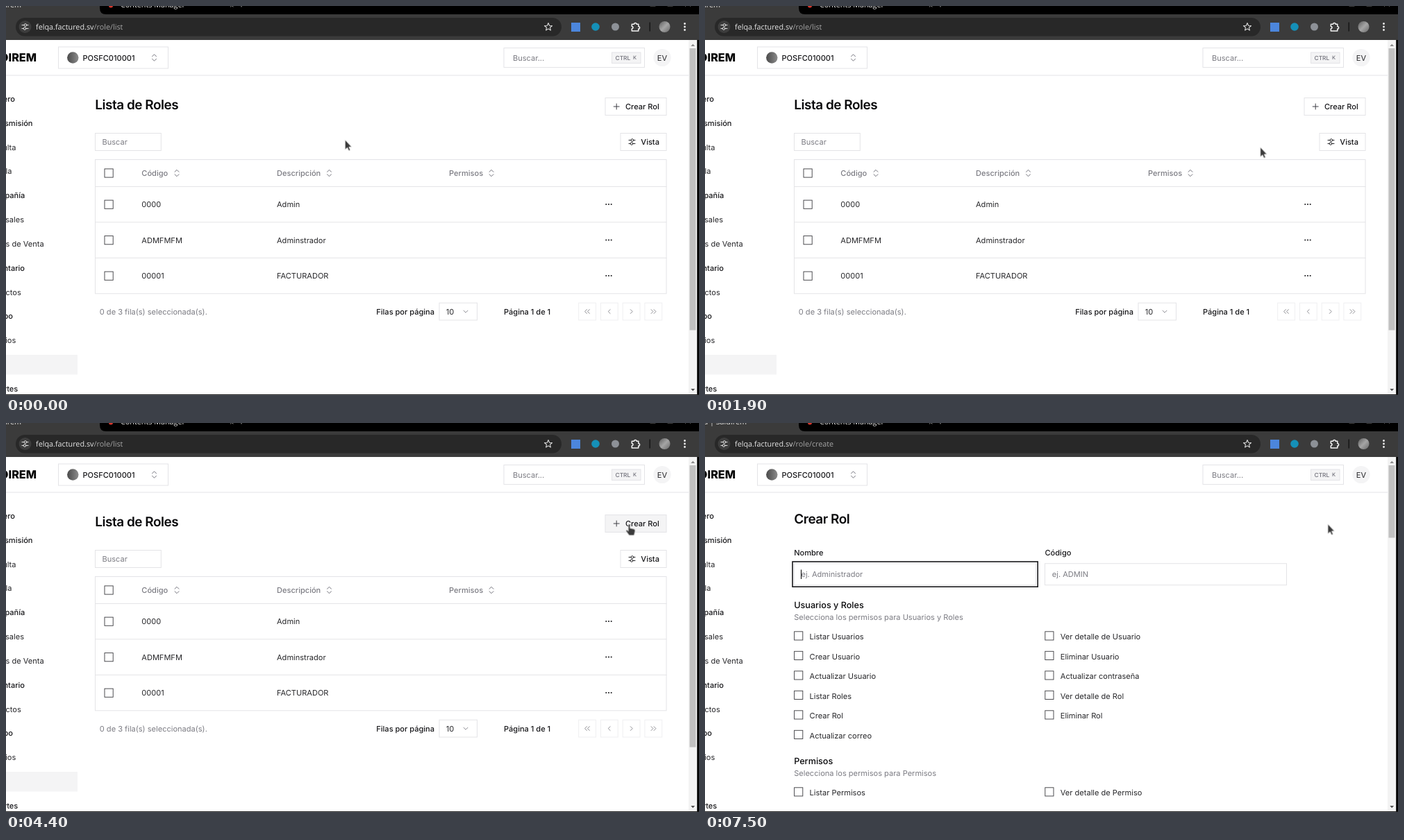
Recreate the animation shown at these times as an HTML page. Size 998 px wide and 561 px high, loop 8000 ms.

```html
<!DOCTYPE html>
<html lang="es">
<head>
<meta charset="utf-8">
<title>Roles</title>
<style>
html, body { margin: 0; width: 100%; height: 100%; overflow: hidden; background: #fff; }
svg { display: block; width: 998px; height: 561px; }
text { font: 400 11.06px Inter, sans-serif; font-optical-sizing: none; fill: #27272a; white-space: pre; text-rendering: geometricPrecision; }
.m { font-weight: 500; fill: #18181b; }
.g { fill: #7c7c83; }
.gm { font-weight: 500; fill: #7c7c83; }
.h1 { font-size: 18.96px; font-weight: 600; letter-spacing: -.025em; fill: #09090b; }
.h2 { font-size: 12.64px; font-weight: 500; fill: #09090b; }
.brand { font-size: 16.2px; font-weight: 800; fill: #000; }
.key { font-size: 8.4px; font-weight: 500; fill: #71717a; }
.bar { font: 400 10.8px "Open Sans", "Noto Sans", sans-serif; fill: #e6e6e6; }
.bar tspan { fill: #a5a5a5; }
.ln { fill: none; stroke: #3f3f46; stroke-width: 1; stroke-linecap: round; stroke-linejoin: round; }
.box { fill: none; stroke: #e4e4e7; }
.chk { fill: #fff; stroke: #3a3a3e; stroke-width: .9; }

.list, .form, .u1, .u2, .t1, .t2, .hover, .caret, .arrow, .hand { animation: 8s step-end infinite; }
.list { animation-name: list; }
.form { animation-name: form; }
.u1 { animation-name: u1; }
.u2 { animation-name: u2; }
.t1 { animation-name: t1; }
.t2 { animation-name: t2; }
.hover { animation-name: hover; }
.caret { animation-name: caret; }
.arrow { animation-name: arrow; }
.hand { animation-name: hand; }
.pointer { animation: move 8s infinite; }
@keyframes list { 0% { opacity: 1 } 71.25%, 100% { opacity: 0 } }
@keyframes form { 0% { opacity: 0 } 71.25%, 100% { opacity: 1 } }
@keyframes u1 { 0% { opacity: 1 } 67.5%, 100% { opacity: 0 } }
@keyframes u2 { 0% { opacity: 0 } 67.5%, 100% { opacity: 1 } }
@keyframes t1 { 0% { opacity: 1 } 75%, 100% { opacity: 0 } }
@keyframes t2 { 0% { opacity: 0 } 75%, 100% { opacity: 1 } }
@keyframes hover { 0% { fill: #fff } 28.75%, 100% { fill: #f4f4f5 } }
@keyframes caret { 0%, 81.25%, 93.75%, 100% { opacity: 1 } 75%, 87.5% { opacity: 0 } }
@keyframes arrow { 0%, 67.5%, 100% { opacity: 1 } 28.75% { opacity: 0 } }
@keyframes hand { 0%, 67.5%, 100% { opacity: 0 } 28.75% { opacity: 1 } }
@keyframes move {
  0%, 11.25% { transform: translate(488.8px, 193.8px); animation-timing-function: ease-out; }
  13.75% { transform: translate(489.5px, 196.5px); animation-timing-function: cubic-bezier(.6, 0, .8, .8); }
  23.75% { transform: translate(800px, 204.5px); animation-timing-function: ease-out; }
  32.5%, 100% { transform: translate(897.5px, 146.5px); }
}
</style>
</head>
<body>
<svg id="stage" viewBox="0 0 998 561" xmlns="http://www.w3.org/2000/svg"></svg>
<script>
// text: c is the vertical centre of the capitals
const text = (x, c, s, cls = '', end) =>
  `<text x="${x}" y="${c + 4}" class="${cls}"${end ? ' text-anchor="end"' : ''}>${s}</text>`;
const rect = (x, y, w, h, fill, extra = '') =>
  `<rect x="${x}" y="${y}" width="${w}" height="${h}" fill="${fill}" ${extra}/>`;
const box = (x, y, w, h, cls = 'box', extra = '') =>
  `<rect x="${x}" y="${y}" width="${w}" height="${h}" class="${cls}" ${extra}/>`;
const dot = (x, y, r, fill) => `<circle cx="${x}" cy="${y}" r="${r}" fill="${fill}"/>`;
const line = (d, x = 0, y = 0, style = '') =>
  `<path class="ln" transform="translate(${x} ${y})" d="${d}" style="${style}"/>`;
const hr = y => rect(128, y, 823.5, 1, '#e4e4e7');
const check = (x, c) => box(x, c - 6.1, 12.2, 12.2, 'chk');
const sorter = (x, y) => line('M-3 -1.7l3 -3l3 3M-3 1.7l3 3l3 -3', x, y, 'stroke:#71717a');
const tune = (x, y, col) =>
  line('M-4.5 -2.5h3M2.4 -2.5h2.1M4.5 2.5h-3M-2.4 2.5h-2.1M2.2 -2.5a1.8 1.8 0 1 1 -3.6 0a1.8 1.8 0 1 1 3.6 0M1.4 2.5a1.8 1.8 0 1 1 -3.6 0a1.8 1.8 0 1 1 3.6 0', x, y, 'stroke:' + col);

function browser() {
  const host = 'felqa.factured.sv';
  return rect(0, 0, 998, 49, '#3b3b3b')
    + '<path d="M135 0H998V12H144q-9 0 -9 -9z" fill="#000"/>'
    + text(22, -2.5, 'Saldirem', 'bar t1', 1)
    + text(60, -2.5, 'Crear Rol - Nueva | Saldirem', 'bar t2', 1)
    + dot(151, -.5, 3, '#d9362b')
    + text(165, -2.5, 'Contents Manager', 'bar')
    + line('M323.5 1l1.5 -1.5M327 1l-1.5 -1.5M339 -2v3', 0, 0, 'stroke:#bbb')
    + line('M928 0h7M953 0h7M978.5 .5l1.5 -1.5M985.5 .5l-1.5 -1.5', 0, 0, 'stroke:#777')
    + rect(14, 17, 786, 26.5, '#282828', 'rx="13.2"')
    + dot(27.5, 30, 9, '#3d3d3d') + tune(27.5, 30, '#e3e3e3')
    + ['list', 'create'].map((p, i) =>
      text(43, 30, `${host}<tspan>/role/${p}</tspan>`, 'bar u' + (i + 1))).join('')
    + line('M0 -5.5L1.6 -1.8L5.5 -1.5L2.5 1.1L3.4 5L0 2.9L-3.4 5L-2.5 1.1L-5.5 -1.5L-1.6 -1.8z', 781, 30, 'stroke:#ddd;stroke-width:1.1')
    + rect(814, 24, 13, 13, '#4c86dc')
    + dot(849, 30, 5.8, '#1590b8')
    + dot(877.5, 30, 5.5, '#8d9197')
    + line('M-5 -3.8h3.2a1.8 1.8 0 0 1 3.6 0h2.7v3.2a1.8 1.8 0 0 1 0 3.6v3h-9.5v-3.2a1.7 1.7 0 0 0 0 -3.4z', 906.3, 30, 'stroke:#f2f2f2;stroke-width:1.5')
    + rect(926.5, 23.5, 1.5, 13, '#161616')
    + dot(948.5, 30, 8, 'url(#photo)')
    + [25.5, 30, 34.5].map(y => dot(977.5, y, 1.4, '#eee')).join('');
}

function header() {
  return rect(0, 99.5, 983, 1, '#e4e4e7')
    + `<text x="44" y="80.3" class="brand" text-anchor="end">SALDIREM</text>`
    + box(75.5, 59, 158, 31)
    + dot(96.3, 74.5, 8.2, 'url(#ball)')
    + text(110.5, 74.5, 'POSFC010001', 'm') + sorter(213.5, 74.5)
    + box(717, 60.5, 202.5, 28)
    + text(730, 74.5, 'Buscar...', 'g')
    + box(872.5, 67, 41.5, 15.5, 'box', 'style="fill:#f4f4f5"')
    + `<text x="877.5" y="77.5" class="key">CTRL</text><text x="903" y="77.3" class="key" style="font-size:7.4px">K</text>`
    + dot(945, 74.5, 12.6, '#f4f4f5') + text(937.8, 74.5, 'EV');
}

// [label, right edge, is heading]
const menu = [
  ['Tablero', 13, 1], ['Transmisión', 38.5, 1], ['Consulta', 14.5], ['Tabla', 8.5],
  ['Compañía', 27.3, 1], ['Sucursales', 26], ['Puntos de Venta', 54.7], ['Inventario', 27, 1],
  ['Productos', 21.8], ['Equipo', 10, 1], ['Usuarios', 14.3], ['', 0], ['Reportes', 17.3, 1]];
const sidebar = () => menu.map(([s, x, head], i) =>
  text(x, 133.8 + 34.85 * i, s, head ? 'm' : '', 1)).join('');

function list() {
  const rows = [['0000', 'Admin'], ['ADMFMFM', 'Adminstrador'], ['00001', 'FACTURADOR']];
  const cols = [['Código', 195.3, 246], ['Descripción', 390, 465.5], ['Permisos', 638, 699]];
  const pager = ['M-.7 -2.9l-2.9 2.9l2.9 2.9M3.3 -2.9l-2.9 2.9l2.9 2.9', 'M1.3 -2.9l-2.9 2.9l2.9 2.9',
    'M-1.3 -2.9l2.9 2.9l-2.9 2.9', 'M.7 -2.9l2.9 2.9l-2.9 2.9M-3.3 -2.9l2.9 2.9l-2.9 2.9'];
  return rect(0, 503, 103, 28.5, '#f4f4f5')
    + `<text x="128.3" y="148.6" class="h1">Lista de Roles</text>`
    + box(863, 132.5, 88, 25, 'box hover')
    + line('M-4 0h8M0 -4v8', 879.2, 145) + text(892, 145, 'Crear Rol', 'm')
    + box(128.5, 183.5, 94.8, 25) + text(138.5, 196.3, 'Buscar', 'g')
    + box(885, 183.5, 66, 25) + tune(901.5, 196, '#27272a') + text(914.3, 195.8, 'Vista', 'm')
    + box(128.5, 221.5, 822.5, 193.3)
    + hr(260) + hr(311.3) + hr(362.8)
    + check(142, 241)
    + cols.map(([s, x, sx]) => text(x, 241, s, 'gm') + sorter(sx, 241)).join('')
    + rows.map(([code, name], i) => {
      const y = 286 + 51.5 * i;
      return check(142, y + .2) + text(195.3, y, code) + text(390, y, name)
        + [-3.7, 0, 3.7].map(d => dot(868 + d, y, 1.1, '#27272a')).join('');
    }).join('')
    + text(134.8, 440.5, '0 de 3 fila(s) seleccionada(s).', 'g')
    + text(533.3, 440.5, 'Filas por página', 'm')
    + box(624, 428.2, 54.5, 24.8) + text(633.8, 440.5, '10')
    + line('M-3 -1.5l3 3l3 -3', 662, 440.7, 'stroke:#8a8a90')
    + text(717, 440.5, 'Página 1 de 1', 'm')
    + pager.map((d, i) => {
      const x = 824.7 + 31.75 * i;
      return box(x, 428.2, 24.8, 24.8, 'box', 'style="stroke:#efeff1"')
        + line(d, x + 12.4, 440.6, 'stroke:#8e8e93');
    }).join('');
}

const section = (name, c, rows) =>
  `<text x="128.2" y="${c + 4.6}" class="h2">${name}</text>`
  + text(128.2, c + 17.3, 'Selecciona los permisos para ' + name, 'g')
  + rows.map((pair, i) => pair.map((s, j) =>
    check(128.6 + 361.2 * j, c + 44.5 + 28.5 * i)
    + text(150.6 + 361.2 * j, c + 45.7 + 28.5 * i, s)).join('')).join('');

function form() {
  return `<text x="128.3" y="145.4" class="h1">Crear Rol</text>`
    + text(128.2, 187, 'Nombre', 'm') + text(489.5, 187, 'Código', 'm')
    + box(128.5, 202.7, 348, 31) + box(489.5, 202.7, 348, 31)
    + box(126, 200, 353.2, 36.2, '', 'fill="none" stroke="#18181b" stroke-width="1.6"')
    + text(138.5, 218.4, 'ej. Administrador', 'g') + text(499.8, 218.4, 'ej. ADMIN', 'g')
    + rect(138, 211.5, 1, 13.5, '#000', 'class="caret"')
    + section('Usuarios y Roles', 262.4, [
      ['Listar Usuarios', 'Ver detalle de Usuario'],
      ['Crear Usuario', 'Eliminar Usuario'],
      ['Actualizar Usuario', 'Actualizar contraseña'],
      ['Listar Roles', 'Ver detalle de Rol'],
      ['Crear Rol', 'Eliminar Rol'],
      ['Actualizar correo']])
    + section('Permisos', 487.4, [['Listar Permisos', 'Ver detalle de Permiso']]);
}

const thumb = (h, cls) => rect(984.5, 61, 9, h, '#c1c1c1', `class="${cls}"`);
const frame = () => rect(983, 49, 12.2, 512, '#f3f3f3')
  + '<path d="M986.3 58l2.9 -3.2l2.9 3.2z" fill="#8a8a8a"/><path d="M986.3 552l2.9 3.2l2.9 -3.2z" fill="#505050"/>'
  + thumb(406.5, 'list') + thumb(104.5, 'form')
  + rect(995.2, 49, 3, 512, '#000') + rect(0, 560, 998, 1, '#1c1c1c');

const pointer = () => '<g class="pointer" stroke="#f4f4f4" stroke-width=".7" stroke-linejoin="round" fill="#3b3b3b">'
  + '<path class="arrow" d="M-.5 -.8V13.2L2.7 10.4L4.9 15L7 14L5 9.6H9z"/>'
  + '<path class="hand" d="M-1.3 .8q0 -1.5 1.3 -1.5t1.3 1.5V5.2l5.2 1.1q2 .5 2 2.4l-.8 4.3l-.9 2.6H0L-4.4 9.6q-.6 -1.4 .6 -1.8q1 -.2 2.5 1.6z"/></g>';

document.getElementById('stage').innerHTML =
  `<defs>
    <linearGradient id="ball"><stop stop-color="#4a4a4a"/><stop offset="1" stop-color="#8c8c8c"/></linearGradient>
    <linearGradient id="photo" x2="1" y2="1"><stop stop-color="#5c5c5c"/><stop offset=".5" stop-color="#a5a5a5"/><stop offset="1" stop-color="#6a6a6a"/></linearGradient>
  </defs>`
  + rect(0, 0, 998, 561, '#fff')
  + browser() + header()
  + `<g class="list">${list()}</g><g class="form">${form()}</g>`
  + sidebar() + frame() + pointer();
</script>
</body>
</html>
```
